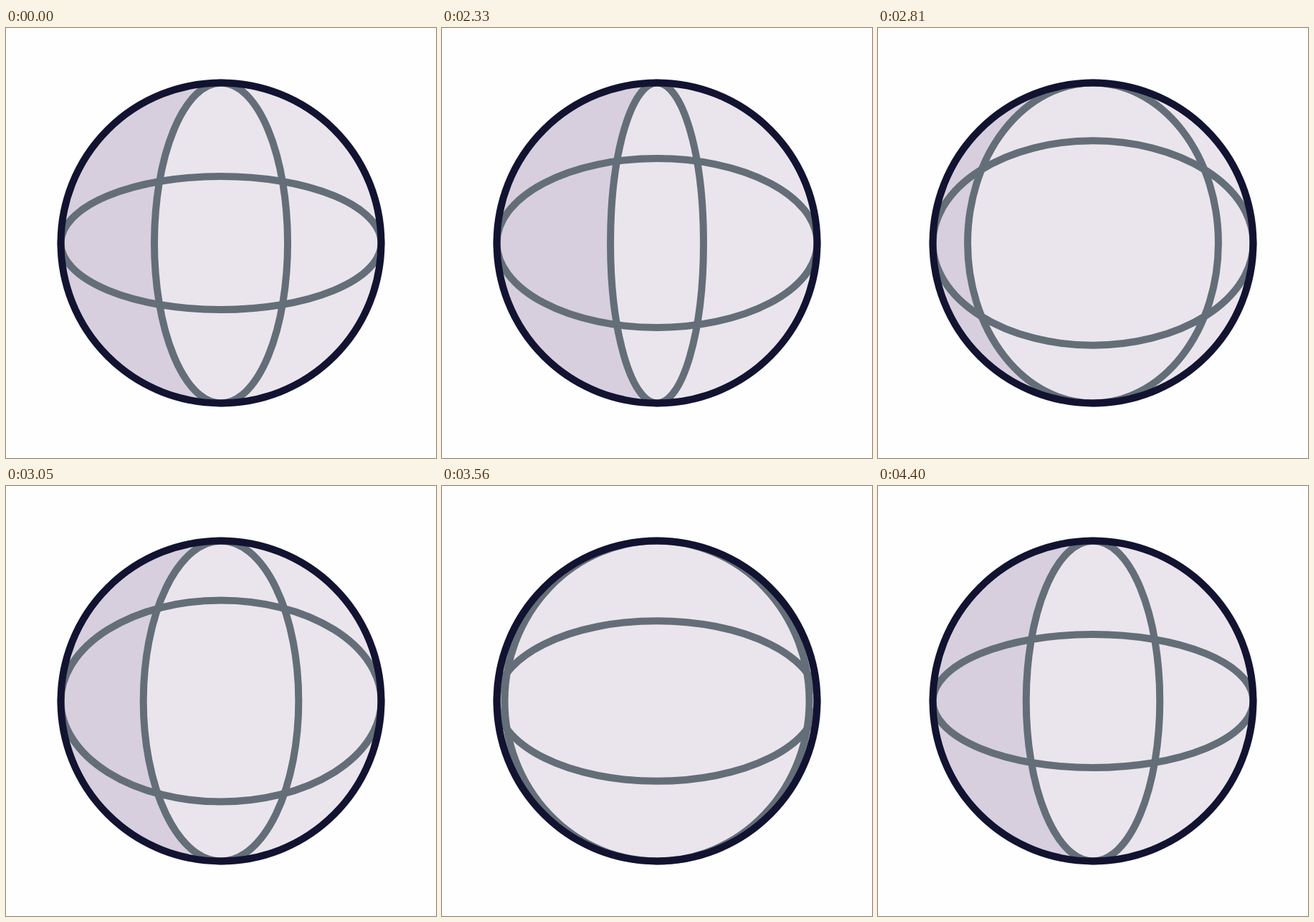
Animation of 600x600 px, one loop 4430 ms. Source, as an HTML page:

```html
<!DOCTYPE html>
<html lang="en">
<head>
<meta charset="utf-8">
<title>Spinning globe</title>
<style>
  html, body { margin: 0; width: 100%; height: 100%; overflow: hidden; background: #fefefe; }
  svg { display: block; width: 100%; height: 100%; }
  .line { fill: none; stroke: #646e78; stroke-width: 10; }
  .rim { fill: none; stroke: #121331; stroke-width: 10; }
</style>
</head>
<body>
<svg viewBox="0 0 600 600">
  <circle cx="300" cy="300" r="223.5" fill="#d7cfde"/>
  <path id="light" fill="#eae5ec"/>
  <ellipse id="parallel" class="line" cx="300" cy="300" rx="223.5"/>
  <ellipse id="meridian" class="line" cx="300" cy="300" ry="223.5"/>
  <circle class="rim" cx="300" cy="300" r="223.5"/>
</svg>
<script>
const LOOP = 4430, START = 2000, STEP = 30;
const R = 223.5, REST = 93;
const REST_ANGLE = Math.asin(REST / R);
const [light, parallel, meridian] =
  ['light', 'parallel', 'meridian'].map(id => document.getElementById(id));

// One full turn: [step, degrees turned, degrees per step]
const TURN = [
  [0, 0, 0.5], [11, 7.7, 1.6], [27, 76.1, 9],
  [42, 258.2, 8.2], [62, 337, 2.2], [81, 360, 0]
];

function turned(k) {
  const i = Math.max(1, TURN.findIndex(p => p[0] >= k));
  const [k0, a, va] = TURN[i - 1], [k1, b, vb] = TURN[i];
  const d = k1 - k0, u = (k - k0) / d, v = 1 - u;
  return v * v * (1 + 2 * u) * a + u * u * (3 - 2 * u) * b
    + d * u * v * (v * va - u * vb);
}

function ease(u, x1, x2) {
  if (u <= 0) return 0;
  if (u >= 1) return 1;
  let lo = 0, hi = 1, s = 0.5;
  for (let i = 0; i < 24; i++) {
    s = (lo + hi) / 2;
    const x = 3 * (1 - s) * s * ((1 - s) * x1 + s * x2) + s ** 3;
    if (x < u) lo = s; else hi = s;
  }
  return s * s * (3 - 2 * s);
}

// The parallels open quickly, then settle back
function tilt(k) {
  const open = ease(k / 22, 0.33, 0.67);
  const close = ease((k - 22) / 58, 0.7, 0.25);
  return REST + 50 * (open - close);
}

function draw(time) {
  const k = Math.max(0, Math.floor((time % LOOP - START) / STEP));
  const rx = R * Math.abs(Math.sin(REST_ANGLE - turned(k) * Math.PI / 180));
  meridian.setAttribute('rx', Math.max(rx, 0.01));
  parallel.setAttribute('ry', tilt(k));
  light.setAttribute('d',
    `M300 ${300 - R}A${R} ${R} 0 0 1 300 ${300 + R}A${rx} ${R} 0 0 1 300 ${300 - R}Z`);
}

let begin;
function tick(now) {
  begin ??= now;
  draw(now - begin);
  requestAnimationFrame(tick);
}
draw(0);
requestAnimationFrame(tick);
</script>
</body>
</html>
```
